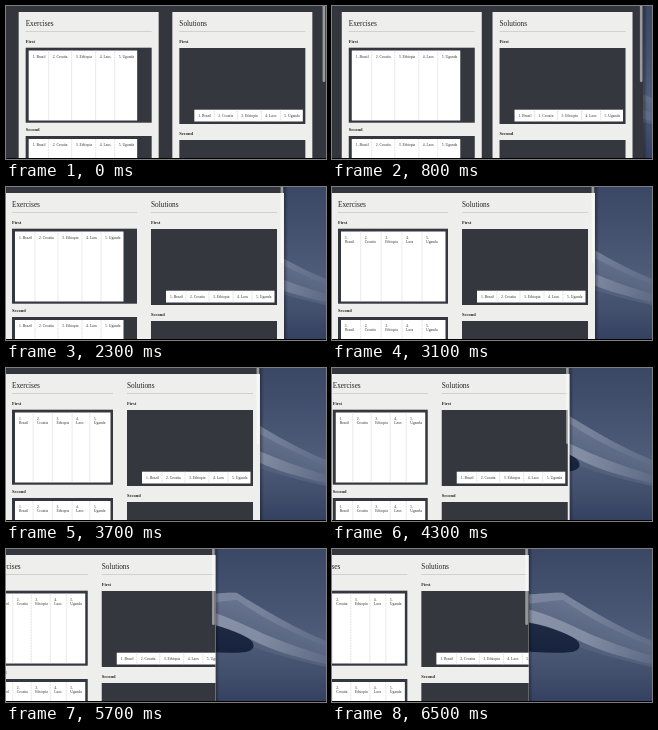
These frames come from a looping animation (320 px wide and 153 px high, 6600 ms). An HTML page with a canvas:

```html
<!DOCTYPE html>
<html lang="en">
<head>
<meta charset="utf-8">
<title>Resizing window</title>
<style>
html, body { margin: 0; width: 100%; height: 100%; overflow: hidden; background: #000; }
canvas { display: block; width: 100vw; height: 100vh; }
</style>
</head>
<body>
<canvas id="stage"></canvas>
<script>
const W = 320, H = 153, LOOP = 6600, STEP = 100;
const canvas = document.getElementById('stage');
const ctx = canvas.getContext('2d');

const DARK = '#34363e', BOX = '#35373f', PANEL = '#eeeeed';
const FONT = '"Liberation Serif", "Times New Roman", serif';
const LEFT = -1;          // window's left edge
const PANEL_MAX = 140, PANEL_MIN = 109, PAD = 7, BOX_PAD = 3;
const NAMES = ['Brazil', 'Croatia', 'Ethiopia', 'Laos', 'Uganda'];

// Column widths: one-line labels, wrapped labels, narrowest labels
const NATURAL = [20, 23, 24, 19, 22.5];
const WRAPPED = [19.7, 20.5, 20.8, 20, 23.5];
const NARROW = [17, 18.5, 19, 16, 19];
const sum = list => list.reduce((a, b) => a + b, 0);

// [time, x of the window's right edge]
const EDGE = [
  [0, 320], [700, 313], [1400, 301], [1500, 299.5], [2100, 281], [2300, 278],
  [2800, 269], [3100, 263], [3400, 263], [3800, 251], [4000, 251], [4300, 237.5],
  [4700, 229], [5400, 212], [5700, 209.5], [6100, 201], [6500, 196.7]
];

const lerp = (a, b, k) => a + (b - a) * k;

function edgeAt(t) {
  for (let i = 1; i < EDGE.length; i++) {
    const [t0, x0] = EDGE[i - 1], [t1, x1] = EDGE[i];
    if (t <= t1) return lerp(x0, x1, (t - t0) / (t1 - t0));
  }
  return EDGE[EDGE.length - 1][1];
}

function rect(x, y, w, h, fill) {
  ctx.fillStyle = fill;
  ctx.fillRect(x, y, w, h);
}

function text(str, x, y, size, color = '#333', weight = 'normal') {
  ctx.font = `${weight} ${size}px ${FONT}`;
  ctx.fillStyle = color;
  ctx.fillText(str, x, y);
}

function fade(x0, y0, x1, y1, ...colors) {
  const g = ctx.createLinearGradient(x0, y0, x1, y1);
  colors.forEach((c, i) => g.addColorStop(i / (colors.length - 1), c));
  return g;
}

function shape(path, fill) {
  ctx.fillStyle = fill;
  ctx.fill(new Path2D(path));
}

function drawDunes() {
  rect(0, 0, W, H, fade(0, 0, 0, 95, '#3b4865', '#44526f', '#505d7b'));
  // Slope below the crest
  shape('M180 46 C205 46 222 43 231 44 C256 60 290 80 320 92 V153 H180 Z',
    fade(215, 44, 185, 150, '#69758f', '#56637f', '#465370', '#3a4663'));
  // Lit crest and the pale band above the shadow
  shape('M180 46 C205 46 222 43 231 44 C256 60 290 80 320 92 V97 C290 86 258 70 231 51 C214 52 200 55 180 56 Z',
    fade(190, 44, 320, 95, '#7c879f', '#76819a', '#5f6c88'));
  shape('M180 58 C208 60 234 74 258 85 C280 94 300 101 320 107 V115 C292 109 265 101 244 90 C226 80 206 73 180 72 Z',
    fade(190, 58, 320, 112, '#8b94a9', '#828ca2', '#5f6b86'));
  // Lower slope and shadow
  shape('M180 101 C205 104 230 104 247 98 C270 106 300 114 320 118 V153 H180 Z',
    fade(0, 98, 0, 153, '#4c5976', '#414e6c', '#34405f'));
  shape('M180 72 C206 73 226 81 240 88 C250 93 250 101 240 103 C222 105 200 103 180 101 Z',
    fade(0, 72, 0, 104, '#1f2b46', '#17223c'));
}

function drawList(x, y, h, widths, wrap, baseline) {
  rect(x, y, sum(widths), h, '#fff');
  widths.forEach((w, i) => {
    if (i) {
      ctx.strokeStyle = '#c8c8c8';
      ctx.lineWidth = .6;
      ctx.setLineDash([1, .6]);
      ctx.beginPath();
      ctx.moveTo(x, y);
      ctx.lineTo(x, y + h);
      ctx.stroke();
      ctx.setLineDash([]);
    }
    const n = `${i + 1}.`;
    if (wrap) {
      text(n, x + 4, baseline, 3.75);
      text(NAMES[i], x + 4, baseline + 4.3, 3.75);
    } else {
      text(`${n} ${NAMES[i]}`, x + 4, baseline, 3.75);
    }
    x += w;
  });
}

function drawPanel(x, w, title) {
  rect(x, 6, w, H, PANEL);
  text(title, x + PAD, 20, 7.3, '#222');
  rect(x + PAD, 25.2, w - 2 * PAD, .7, '#c4c4c4');
  text('First', x + PAD, 37, 4.5, '#222', 'bold');
}

function drawExercises(x, w) {
  drawPanel(x, w, 'Exercises');
  const bx = x + PAD, bw = w - 2 * PAD, room = bw - 2 * BOX_PAD + .5;
  const wrap = room < sum(NATURAL);
  const k = (room - sum(NARROW)) / (sum(WRAPPED) - sum(NARROW));
  const widths = wrap ? NARROW.map((n, i) => lerp(n, WRAPPED[i], k)) : NATURAL;
  rect(bx, 41.7, bw, 75, BOX);
  drawList(bx + BOX_PAD, 44.5, 70, widths, wrap, 51.6);
  text('Second', bx, 124.6, 4.5, '#222', 'bold');
  rect(bx, 130, bw, 30, BOX);
  drawList(bx + BOX_PAD, 133, 30, widths, wrap, 139.8);
}

function drawSolutions(x, w) {
  drawPanel(x, w, 'Solutions');
  const bx = x + PAD, bw = w - 2 * PAD;
  rect(bx, 42, bw, 76, BOX);
  drawList(bx + bw - 2.5 - sum(NATURAL), 103.7, 11.8, NATURAL, false, 110.8);
  text('Second', bx, 128.6, 4.5, '#222', 'bold');
  rect(bx, 134, bw, 30, BOX);
}

function drawWindow(edge) {
  rect(edge, 0, 4, H, fade(edge, 0, edge + 4, 0, 'rgba(0,0,0,.35)', 'rgba(0,0,0,0)'));
  ctx.save();
  ctx.beginPath();
  ctx.rect(0, 0, edge, H);
  ctx.clip();
  rect(0, 0, edge, H, DARK);

  // Even gaps, then the left panel shrinks, then both overflow centred
  const room = edge - LEFT;
  const first = Math.max(PANEL_MIN, Math.min(PANEL_MAX, room - PANEL_MAX));
  const free = room - first - PANEL_MAX;
  const gap = Math.max(0, free / 3);
  const x = LEFT + (free < 0 ? free / 2 : gap);
  if (!gap) rect(0, 6, edge, H, PANEL);
  drawExercises(x, first);
  drawSolutions(x + first + gap, PANEL_MAX);

  ctx.fillStyle = 'rgba(255,255,255,.5)';
  ctx.beginPath();
  ctx.roundRect(edge - 3.4, -4, 2.6, 80, 1.3);
  ctx.fill();
  ctx.restore();
}

function resize() {
  const dpr = window.devicePixelRatio || 1;
  canvas.width = Math.round(innerWidth * dpr);
  canvas.height = Math.round(innerHeight * dpr);
}

function draw(now) {
  const t = Math.floor((now % LOOP) / STEP) * STEP;
  ctx.setTransform(canvas.width / W, 0, 0, canvas.height / H, 0, 0);
  drawDunes();
  drawWindow(edgeAt(t));
  rect(0, 152, W, 1, '#000');
}

const start = performance.now();
function tick() {
  draw(performance.now() - start);
  requestAnimationFrame(tick);
}

addEventListener('resize', resize);
resize();
tick();
</script>
</body>
</html>
```
